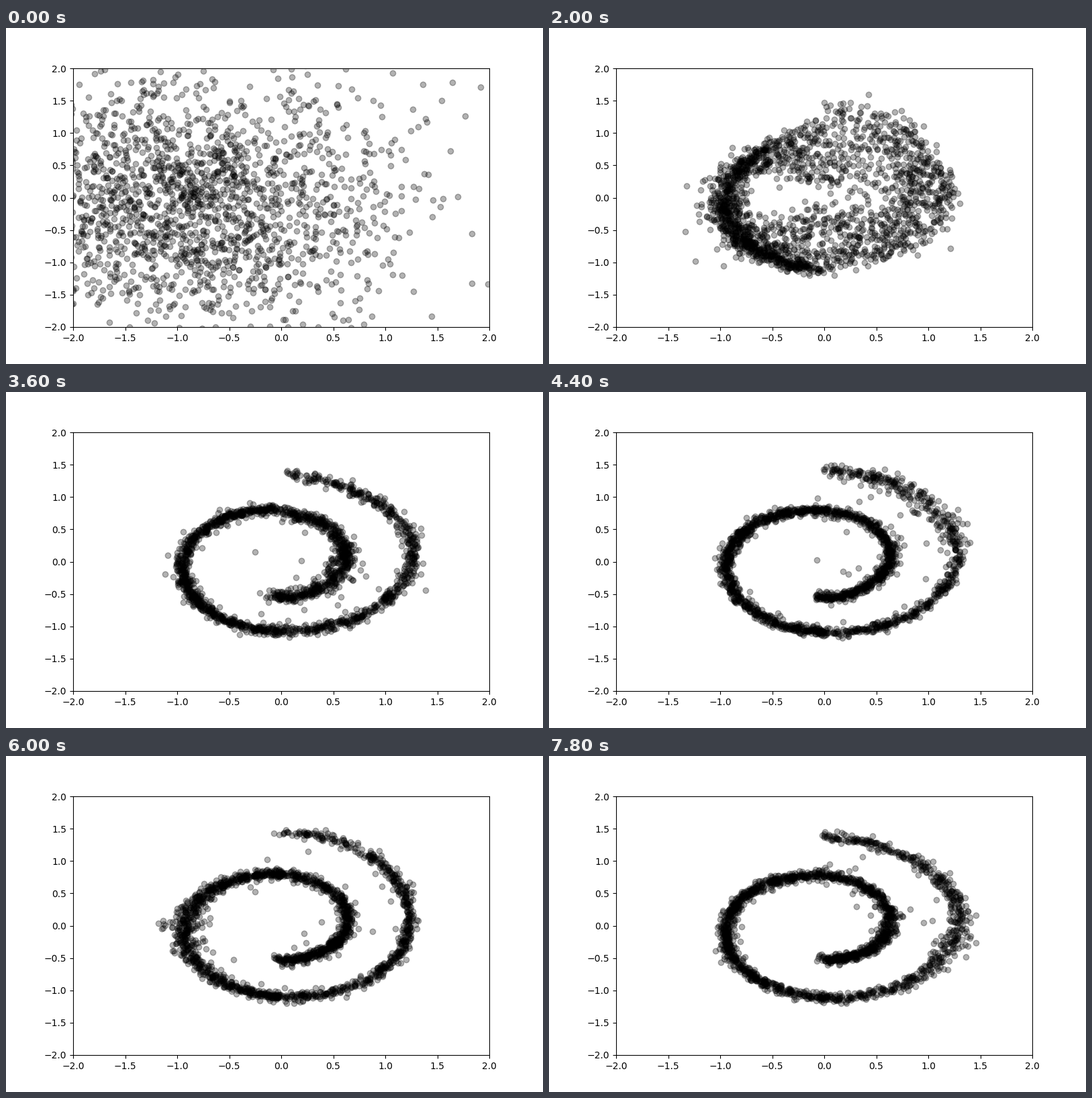
A matplotlib script for the animation above (8 s loop, 800 px wide and 500 px high).

```python
import numpy as np
import matplotlib.pyplot as plt
from matplotlib.animation import FuncAnimation

N = 2000
FRAMES = 40
PI = np.pi
CENTER = np.array([0.45, 0.1])


def bump(x, center, width):
    return np.exp(-((x - center) / width) ** 2)


def polar(r, angle):
    return np.c_[r * np.cos(angle), r * np.sin(angle)]


def outline(angle):
    """Egg-shaped edge of the early blob, for angles from -PI to 1.5 PI."""
    t = angle + np.where(angle > PI / 2, 2 * PI, 4 * PI)
    r = t / 10 + 0.1 * bump(t, 4.4 * PI, 0.5)
    r += np.where(angle > PI / 2, 0.5 * np.exp(-(t - 2.5 * PI) / 0.4), 0)
    return polar(r, angle)


def spiral(t, k):
    """Swiss roll whose arms sway a little from step to step."""
    sway = 0.04 * np.cos(0.3 * (k - 18))
    r = t / 10 + 0.3 * np.exp(-k / 18) * bump(t, 1.5 * PI, 0.5)
    r += sway * bump(t, 4.05 * PI, 0.6) + (0.01 - sway) * bump(t, 4.4 * PI, 0.5)
    r += 0.01 * np.sin(t + 1.7 * k)
    return polar(r, t)


def sample(k):
    """Points drawn at training step k: a cloud, then a blob, then a spiral."""
    rng = np.random.default_rng(100 + k)
    smear = 1 / (1 + np.exp((k - 14) / 1.2))
    early = np.exp(-k / 10)

    # Left half is a single arm, right half has an inner and an outer one
    n_left = int(N * (0.4 + 0.04 * smear))
    m = N - n_left
    left = PI * (2.5 + rng.beta(1 + 1.2 * smear, 1 + 0.5 * smear, n_left))
    right = rng.uniform(1.5 * PI - 0.5 * np.exp(-k / 18), 2.5 * PI, m)
    t = np.r_[left, right + 2 * PI * rng.integers(0, 2, m)]
    roll = spiral(t, k)

    # In the blob the left points form the rim, the others fill the inside
    fan = 1.65 * rng.uniform(-PI / 2, PI / 2, m)
    reach = rng.random((m, 1)) ** 0.4
    fill = CENTER + (outline(fan) - CENTER) * reach
    blob = np.r_[outline(left - 2 * PI), fill]

    stray_odds = (0.02 + 0.1 * early) * (0.3 + 3 * bump(right, 2.5 * PI, 0.3))
    mix = np.full(N, smear)
    mix[n_left:] = np.where(rng.random(m) < stray_odds, rng.random(m), smear)
    pts = roll + (blob - roll) * mix[:, None]

    rough = PI * (1.5 + 3 * ((0.7 * k + 0.517) % 1))
    width = (0.03 + 0.016 * smear) * (1 + bump(t, rough, 0.6))
    pts += width[:, None] * rng.standard_t(5, (N, 2))

    if k < 6:
        rest = (1 - k / 6) ** 2
        cloud = rng.normal((-0.95, -0.1), (1.0, 0.95), (N, 2))
        pts = rest * cloud + (1 - rest) * pts

    far = int(1 + 14 * early)
    pts[:far] = rng.normal(0, 0.7 + 0.5 * early, (far, 2))
    return pts


fig, ax = plt.subplots(figsize=(8, 5), dpi=100)
ax.set_xlim(-2, 2)
ax.set_ylim(-2, 2)
dots, = ax.plot([], [], "o", color="black", alpha=0.3)


def update(k):
    dots.set_data(*sample(k).T)
    return dots,


anim = FuncAnimation(fig, update, frames=FRAMES, interval=200,
                     repeat=True, repeat_delay=0)
plt.show()
```
